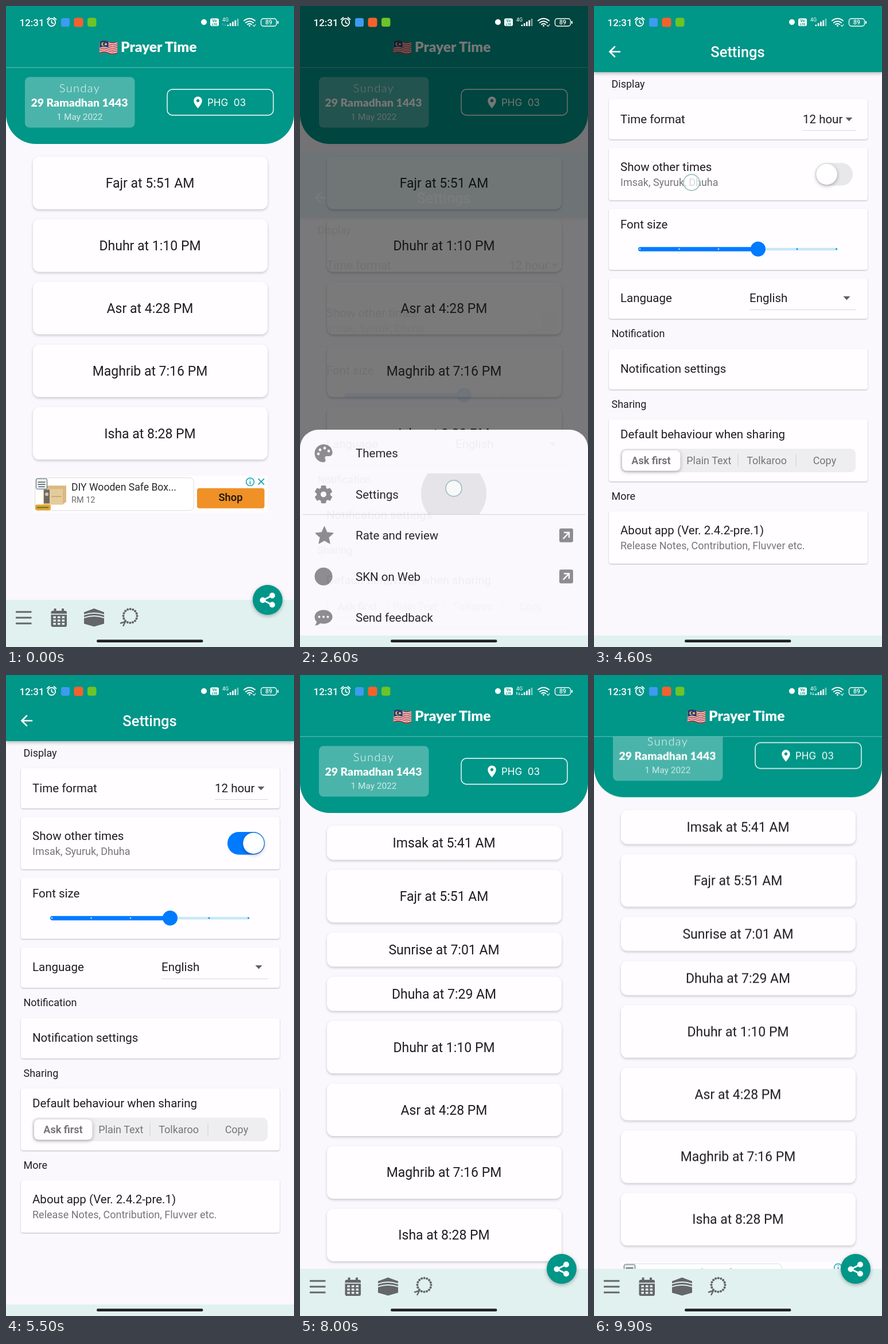
Recreate the animation shown at these times as an HTML page. Size 502 px wide and 1115 px high, loop 10 s.

```html
<!DOCTYPE html>
<html lang="en">
<head>
<meta charset="utf-8">
<title>Prayer times</title>
<style>
  html, body { margin: 0; width: 100%; height: 100%; overflow: hidden; background: #faf8fc; }
  svg { display: block; width: 502px; height: 1115px; }
  text { white-space: pre; font-family: Roboto, sans-serif; }
  .card { fill: #fffdff; filter: drop-shadow(0 2px 2px rgba(0,0,0,.2)); }
  .tile { fill: #fffdff; filter: drop-shadow(0 1px 1px rgba(0,0,0,.26)); }
  .soft { filter: drop-shadow(0 2px 3px rgba(0,0,0,.3)); }
  .ripple { transform-box: fill-box; transform-origin: center; opacity: 0; }
  .dot { fill: rgba(255,255,255,.72); stroke: #a8c6c4; stroke-width: 2; opacity: 0; }
</style>
</head>
<body>
<svg id="stage" viewBox="0 0 502 1115"></svg>
<script>
const LOOP = 10000, TEAL = '#009688', PAGE = '#faf8fc', INK = '#1e1d20', GREY = '#767578', ICON = '#88878a', BLUE = '#007aff';

const rect = (x, y, w, h, r, fill, more = '') =>
  `<rect x="${x}" y="${y}" width="${w}" height="${h}" rx="${r}" fill="${fill}" ${more}/>`;
const disc = (x, y, r, fill, more = '') => `<circle cx="${x}" cy="${y}" r="${r}" fill="${fill}" ${more}/>`;
const text = (x, y, size, str, fill = INK, more = '') =>
  `<text x="${x}" y="${y}" font-size="${size}" fill="${fill}" ${more}>${str}</text>`;
const mid = (x, y, size, str, fill, more = '') => text(x, y, size, str, fill, `text-anchor="middle" ${more}`);
const path = (d, fill, more = '') => `<path d="${d}" fill="${fill}" ${more}/>`;
const line = (d, color, width, more = '') =>
  path(d, 'none', `stroke="${color}" stroke-width="${width}" stroke-linecap="round" ${more}`);
const group = (id, body, more = '') => `<g id="${id}" ${more}>${body}</g>`;
const times = (n, fn) => Array.from({ length: n }, (_, i) => fn(i)).join('');
const polar = (cx, cy, r, a) => `${(cx + r * Math.cos(a)).toFixed(1)} ${(cy + r * Math.sin(a)).toFixed(1)}`;

/* status bar */
function statusBar() {
  return text(23.5, 35, 17, '12:31', '#fff', 'font-weight="500"')
    + disc(79.5, 28.5, 6.6, 'none', 'stroke="#fff" stroke-width="1.8"')
    + line('M79.5 25v4l3 1.5M71.5 23.5l4-3.5M87.5 23.5l-4-3.5', '#fff', 1.7)
    + rect(96, 21, 15, 15, 3, '#3d9bf0') + rect(118.5, 20.5, 16, 16, 4, '#f4622c') + rect(142, 20.5, 15.5, 15.5, 4, '#6cc427')
    + disc(345, 28, 5, '#fff')
    + rect(356, 21.5, 15, 13.5, 3, '#fff')
    + mid(363.5, 28, 6.5, 'Vo', TEAL, 'font-weight="700"') + mid(363.5, 34, 5.6, 'LTE', TEAL, 'font-weight="700"')
    + text(377, 27, 9, '4G', '#fff')
    + group('arrows', line('M378 30.5v4m-1.2-2.8 1.2-1.2 1.2 1.2M382 30.5v4m-1.2-1.2 1.2 1.2 1.2-1.2', '#fff', .9))
    + times(5, i => rect(385.5 + i * 4.3, 32.5 - i * 2.6, 2.7, 2.5 + i * 2.6, .6, '#fff', i > 3 ? 'opacity=".5"' : ''))
    + line('M415 25.5q9.5-7.5 19 0M418 29q6.5-5 13 0M421 32q3.5-2.5 7 0', '#fff', 2.1)
    + disc(424.5, 34.4, 1.4, '#fff') + line('M430.5 33.5l2 2 2.5-3.5', '#fff', 1.1)
    + rect(444.5, 22, 27, 13, 4, 'none', 'stroke="#fff" stroke-width="1.4"')
    + mid(458, 32.3, 10.5, '89', '#fff', 'font-weight="500"') + rect(473, 26, 2, 5, 1, '#fff');
}

/* home page */
function flag() {
  const wave = y => `M163.500 ${y}q7.500-3.500 15 0t15 0`;
  return times(13, i => line(wave(62.8 + i * 1.55), i % 2 ? '#f4f0f0' : '#d1282f', 1.7, 'stroke-linecap="butt"'))
    + path('M163.500 62q7.500-3.500 15 0v10.500q-7.500-3.500-15 0z', '#243a80')
    + disc(169.5, 66.3, 3.1, '#f7cf2d') + disc(171, 66.3, 2.5, '#243a80') + disc(174, 66.5, 1.9, '#f7cf2d');
}

function header() {
  return path('M0 100H502V188a52 52 0 0 1-52 52H52a52 52 0 0 1-52-52z', TEAL)
    + rect(33, 123.5, 191.5, 88, 8, '#4bb4aa')
    + mid(128.5, 149.5, 20, 'Sunday', '#f2fbfa', 'style="font-family:Lato,sans-serif;font-weight:300;letter-spacing:1.4px"')
    + mid(128, 175, 19.4, '29 Ramadhan 1443', '#fff', 'style="font-family:Lato,sans-serif;font-weight:900"')
    + mid(128.5, 197.5, 15.4, '1 May 2022', '#cfeae7')
    + rect(281, 145, 185, 45, 9, 'none', 'stroke="#fff" stroke-width="1.4"')
    + path('M334.500 178c-4-5-7.200-9-7.200-13.300a7.200 7.200 0 0 1 14.400 0c0 4.300-3.200 8.300-7.200 13.300zm0-16a2.700 2.700 0 1 0 .01 0z', '#fff', 'fill-rule="evenodd"')
    + text(351, 174, 17, 'PHG  03', '#fff', 'style="font-family:Inter,sans-serif"');
}

function advert(y) {
  const box = rect(47, -3, 409, 64, 2, '#fffdff')
    + rect(50.5, .5, 276.5, 57, 7, '#fff', 'stroke="#dcdadf"')
    + path('M65 20l8-6h32v28l-6 5H65z', '#d9b983') + path('M65 20h34v27H65z', '#e6cb9a')
    + rect(66, 21, 10, 24, 1, '#6f6860') + disc(71, 29, 3, '#c9c5c0') + line('M80 33h16', '#c3a066', 1.5)
    + rect(52.5, 2, 19, 18, 2, '#f7f3e4', 'stroke="#3b5a86"') + line('M56 8h12M56 12h12M57 16h10', '#3b5a86', 1.6)
    + rect(51, 47, 27, 10, 3, '#e4a531') + line('M55 52h18', '#7a7a2c', 2.5)
    + text(114, 23, 17.6, 'DIY Wooden Safe Box...', '#29282b') + text(114, 44, 14.5, 'RM 12', '#6d6c70')
    + rect(333, 18.5, 117.5, 35, 4, '#ef9126') + mid(391.5, 41, 18.3, 'Shop', '#141210', 'font-weight="500"')
    + disc(425.5, 7.5, 6.8, 'none', 'stroke="#12a5b5" stroke-width="1.5"') + line('M425.500 7v4M425.500 3.700v.2', '#12a5b5', 1.7)
    + line('M440 2.500l9.500 9.500m0-9.500l-9.500 9.500', '#12a5b5', 1.7);
  return `<g transform="translate(0 ${y})">${box}</g>`;
}

function timesList(id, rows) {
  let y = 262;
  const cards = rows.map(([name, at, small]) => {
    const h = small ? 59.500 : 91.500;
    const out = rect(47, y, 409, h, 11, '#fffdff', 'class="card"') + mid(251, y + h / 2 + 8.3, 23, `${name} at ${at}`);
    y += h + 17.4;
    return out;
  });
  return group(id, cards.join('') + advert(y + 13.700));
}

function bottomBar() {
  const c = '#656668';
  return rect(0, 1033, 502, 82, 0, '#e0f1f0')
    + times(3, i => rect(17, 1052.6 + i * 10, 27.5, 2.8, .5, c))
    + rect(78.500, 1052, 27.500, 28, 3, c) + rect(83.500, 1048, 4, 6, 1, c) + rect(97, 1048, 4, 6, 1, c)
    + rect(78.500, 1057, 27.500, 1.700, 0, '#e0f1f0')
    + times(9, i => rect(82.3 + i % 3 * 7.6, 1061.5 + Math.floor(i / 3) * 5.700, 4.600, 3.600, .5, '#e0f1f0'))
    + path('M136 1054.500L153.500 1048 171 1054.500V1058q-17.500-6-35 0z', c)
    + path('M136 1060q17.500-6 35 0v3q-17.500-6-35 0z', c)
    + path('M136 1065q17.500-6 35 0v9.500L153.500 1079.500 136 1074.500z', c)
    + disc(216.500, 1061, 12, 'none', `stroke="${c}" stroke-width="4.200" stroke-linecap="round" stroke-dasharray="0 4.700"`)
    + line('M208 1071l-8 2.500M208 1071l-3.500 7', c, 2.400)
    + disc(30.500, 1064, 30, '#5f7f7d', 'id="menuRipple" class="ripple"')
    + disc(456, 1033, 26, TEAL, 'class="soft"')
    + line('M464 1025.500L448 1033.500 464 1041.500', '#fff', 3)
    + disc(464, 1025.500, 5, '#fff') + disc(447.500, 1033.500, 5, '#fff') + disc(464, 1041.500, 5, '#fff');
}

function home() {
  const [imsak, fajr, sunrise, dhuha, ...rest] = [
    ['Imsak', '5:41 AM', 1], ['Fajr', '5:51 AM'], ['Sunrise', '7:01 AM', 1], ['Dhuha', '7:29 AM', 1],
    ['Dhuhr', '1:10 PM'], ['Asr', '4:28 PM'], ['Maghrib', '7:16 PM'], ['Isha', '8:28 PM']];
  return rect(0, 0, 502, 1115, 0, PAGE)
    + group('scroll', header() + timesList('shortList', [fajr, ...rest])
      + timesList('fullList', [imsak, fajr, sunrise, dhuha, ...rest]))
    + rect(0, 0, 502, 107, 0, TEAL) + rect(0, 106.500, 502, 1, 0, '#6fc2ba')
    + flag() + text(200, 80, 24.600, 'Prayer Time', '#fff', 'style="font-family:Lato,sans-serif;font-weight:900"')
    + bottomBar();
}

/* menu sheet, drawn from its own top edge */
function sheet() {
  const rows = ['Themes', 'Settings', 'Rate and review', 'SKN on Web', 'Send feedback'];
  const y = i => 41 + i * 71.400;
  const star = times(10, i => (i ? 'L' : 'M') + polar(42.500, y(2) + 1, i % 2 ? 7.500 : 16, (i * 36 - 90) * Math.PI / 180)) + 'z';
  const link = cy => rect(452, cy - 12, 24, 24, 3, ICON)
    + line(`M459.500 ${cy + 5}l9-9.500m-7.500-.5h8v8`, PAGE, 2.500);
  return path('M0 420V32a32 32 0 0 1 32-32H470a32 32 0 0 1 32 32V420z', PAGE)
    + group('rowClip', disc(268, 111, 57, '#dedce2', 'id="rowRipple" class="ripple"'), 'clip-path="url(#row)"')
    + rect(5, 147, 492, 1, 0, '#d3d1d6')
    + path(`M41 ${y(0) - 15.500}a15.500 15.500 0 0 0 0 31c4 0 4-3.500 3-5.500-1.500-3 0-5 3-5h4c4 0 5.500-3 5.500-6.500 0-8-7-14-15.500-14z`, ICON)
    + [[32, 1], [35, -6], [43, -9], [50, -4]].map(([x, d]) => disc(x, y(0) + d, 2.400, PAGE)).join('')
    + times(6, i => rect(36.500, y(1) - 15.500, 9, 9, 2, ICON, `transform="rotate(${i * 60} 41 ${y(1)})"`))
    + disc(41, y(1), 8.500, 'none', `stroke="${ICON}" stroke-width="7"`)
    + path(star, ICON, `stroke="${ICON}" stroke-width="1.500" stroke-linejoin="round"`)
    + disc(41, y(3), 15.500, ICON)
    + path(`M41 ${y(4) - 13}c9 0 15.500 5.500 15.500 12S50 ${y(4) + 11} 41 ${y(4) + 11}q-3 0-5.500-1-4 4-9.500 4 3-3 3-6.500-3.500-3.500-3.500-8.500c0-6.500 6.500-12 15.500-12z`, ICON)
    + [33.500, 41, 48.500].map(x => disc(x, y(4) - 1, 2, PAGE)).join('')
    + rows.map((r, i) => text(97, y(i) + 7.300, 20.500, r)).join('')
    + link(y(2)) + link(y(3));
}

/* settings page */
function settings() {
  const tile = (y, h) => rect(26, y, 451, h, 4, '#fffdff', 'class="tile"');
  const label = (y, s) => text(30.500, y, 18, s);
  const title = (y, s, x = 46) => text(x, y, 20.500, s);
  const note = (y, s) => text(46, y, 18, s, GREY);
  const drop = (x, y) => path(`M${x - 6} ${y - 3}h12l-6 6.500z`, '#606063');
  return rect(0, 0, 502, 1115, 0, PAGE)
    + rect(0, 0, 502, 115, 0, TEAL, 'class="soft"')
    + disc(36, 80, 31, '#fff', 'id="backRipple" class="ripple"')
    + line('M45 79.500H28M36 71l-8.500 8.500L36 88', '#fff', 2.700)
    + mid(250.500, 88.500, 25.500, 'Settings', '#fff', 'font-weight="500"')
    + [[162, 70], [247, 91], [353, 106], [474, 70], [597, 70], [719, 108], [879, 91]].map(a => tile(...a)).join('')
    + label(141.500, 'Display') + title(203.500, 'Time format') + title(203.500, '12 hour', 364) + drop(444.500, 197)
    + rect(364, 216, 92, 1, 0, '#d8d7db')
    + title(287, 'Show other times') + note(313, 'Imsak, Syuruk, Dhuha')
    + rect(386, 273, 65, 39.500, 19.700, '#e8e7ea') + rect(386, 273, 65, 39.500, 19.700, BLUE, 'id="switchOn"')
    + disc(405.500, 292.700, 18.300, '#fff', 'id="knob" class="soft"')
    + title(387, 'Font size')
    + rect(280, 420.700, 145, 4.500, 2.200, '#c6e8f7') + rect(77, 419.200, 209, 7.500, 3.700, BLUE)
    + times(6, i => disc(80 + i * 68.500, 422.800, 1.400, i < 4 ? '#b9dcff' : BLUE)) + disc(286, 422.800, 13, BLUE)
    + title(515, 'Language') + title(515, 'English', 271) + drop(440.500, 508) + rect(271, 528, 185, 1, 0, '#d8d7db')
    + label(576, 'Notification') + title(638, 'Notification settings')
    + label(699, 'Sharing') + title(752, 'Default behaviour when sharing')
    + rect(46, 770, 410, 41, 9, '#eeedf0') + rect(49, 773, 101.500, 35.500, 8, '#fffdff', 'class="soft"')
    + rect(250.500, 780, 1, 21, 0, '#d0cfd3') + rect(351.500, 780, 1, 21, 0, '#d0cfd3')
    + ['Ask first', 'Plain Text', 'Tolkaroo', 'Copy'].map((s, i) =>
      mid(99.500 + i * 100.800, 797, 18, s, GREY, i ? '' : 'font-weight="700"')).join('')
    + label(858.500, 'More') + title(918.500, 'About app (Ver. 2.4.2-pre.1)')
    + note(944.500, 'Release Notes, Contribution, Fluvver etc.');
}

const touch = (id, x, y) => disc(x, y, 14, '', `id="${id}" class="dot"`);
document.getElementById('stage').innerHTML =
  '<defs><clipPath id="row"><rect y="76" width="502" height="71.500"/></clipPath></defs>'
  + home() + group('barrier', rect(0, 0, 502, 1095, 0, '#000'))
  + group('sheet', sheet()) + group('settings', settings())
  + rect(0, 1095, 502, 20, 0, '#e0f1f0') + rect(158, 1102.300, 185.500, 4.800, 2.400, '#222')
  + statusBar()
  + touch('tapMenu', 30, 1064) + touch('tapRow', 268, 839) + touch('tapTile', 170, 307)
  + touch('tapBack', 36, 80) + touch('drag', 250, 800);

/* motion: rows of [ms, properties, easing to the next row] */
const start = document.timeline.currentTime || 0;
function play(id, steps) {
  const rows = [[0, steps[0][1]], ...steps, [LOOP, steps[steps.length - 1][1]]];
  const frames = rows.map(([ms, props, easing = 'linear']) => ({ ...props, offset: ms / LOOP, easing }));
  document.getElementById(id).animate(frames, { duration: LOOP, iterations: Infinity }).startTime = start;
}
const alpha = opacity => ({ opacity });
const moveY = (y, more) => ({ transform: `translateY(${y}px)`, ...more });
const show = (id, from, to, fade = 100) =>
  play(id, [[from - 1, alpha(0)], [from, alpha(1)], [to, alpha(1)], [to + fade, alpha(0)]]);
const ripple = (id, from, to, peak) => play(id, [
  [from, { opacity: 0, transform: 'scale(.4)' }, 'ease-out'], [from + 90, { opacity: peak, transform: 'scale(1)' }],
  [to, { opacity: peak, transform: 'scale(1)' }], [to + 150, { opacity: 0, transform: 'scale(1)' }]]);

const glide = 'cubic-bezier(.4,0,.2,1)';
play('sheet', [[1080, moveY(1095), 'cubic-bezier(0,0,.2,1)'], [1330, moveY(737)],
  [2600, moveY(737), 'ease-in'], [2800, moveY(1095)]]);
play('barrier', [[1080, alpha(0), 'ease'], [1330, alpha(.54)], [2600, alpha(.54)], [2800, alpha(0)]]);
play('settings', [[2549, moveY(279)], [2550, moveY(279), glide], [2850, moveY(0)],
  [7450, moveY(0), 'cubic-bezier(.8,0,.6,1)'], [7750, moveY(279)]]);
play('settings', [[2550, alpha(0), 'ease-in'], [2850, alpha(1)], [7450, alpha(1), 'ease-out'], [7750, alpha(0)]]);
play('shortList', [[5000, alpha(1)], [5000, alpha(0)]]);
play('fullList', [[5000, alpha(0)], [5000, alpha(1)]]);
play('switchOn', [[4720, alpha(0), 'ease'], [4950, alpha(1)]]);
play('knob', [[4720, { transform: 'translateX(0px)' }, 'ease-in-out'], [4950, { transform: 'translateX(26px)' }]]);
play('scroll', [[8880, moveY(0), 'ease-out'], [9400, moveY(-27.400)]]);
play('arrows', [[1100, alpha(.3)], [1100, alpha(1)], [2300, alpha(1)], [2300, alpha(0)], [7000, alpha(0)], [7000, alpha(1)]]);

show('tapMenu', 900, 1020);
show('tapRow', 2500, 2610);
show('tapTile', 4600, 4640);
show('tapBack', 7300, 7420);
play('drag', [[8799, moveY(0, alpha(0))], [8800, moveY(0, alpha(1))], [8880, moveY(0, alpha(1)), 'ease-out'],
  [9300, moveY(-180, alpha(1))], [9400, moveY(-180, alpha(0))]]);
ripple('menuRipple', 900, 1050, .2);
ripple('rowRipple', 2480, 2610, .75);
ripple('backRipple', 7290, 7430, .2);
</script>
</body>
</html>
```
